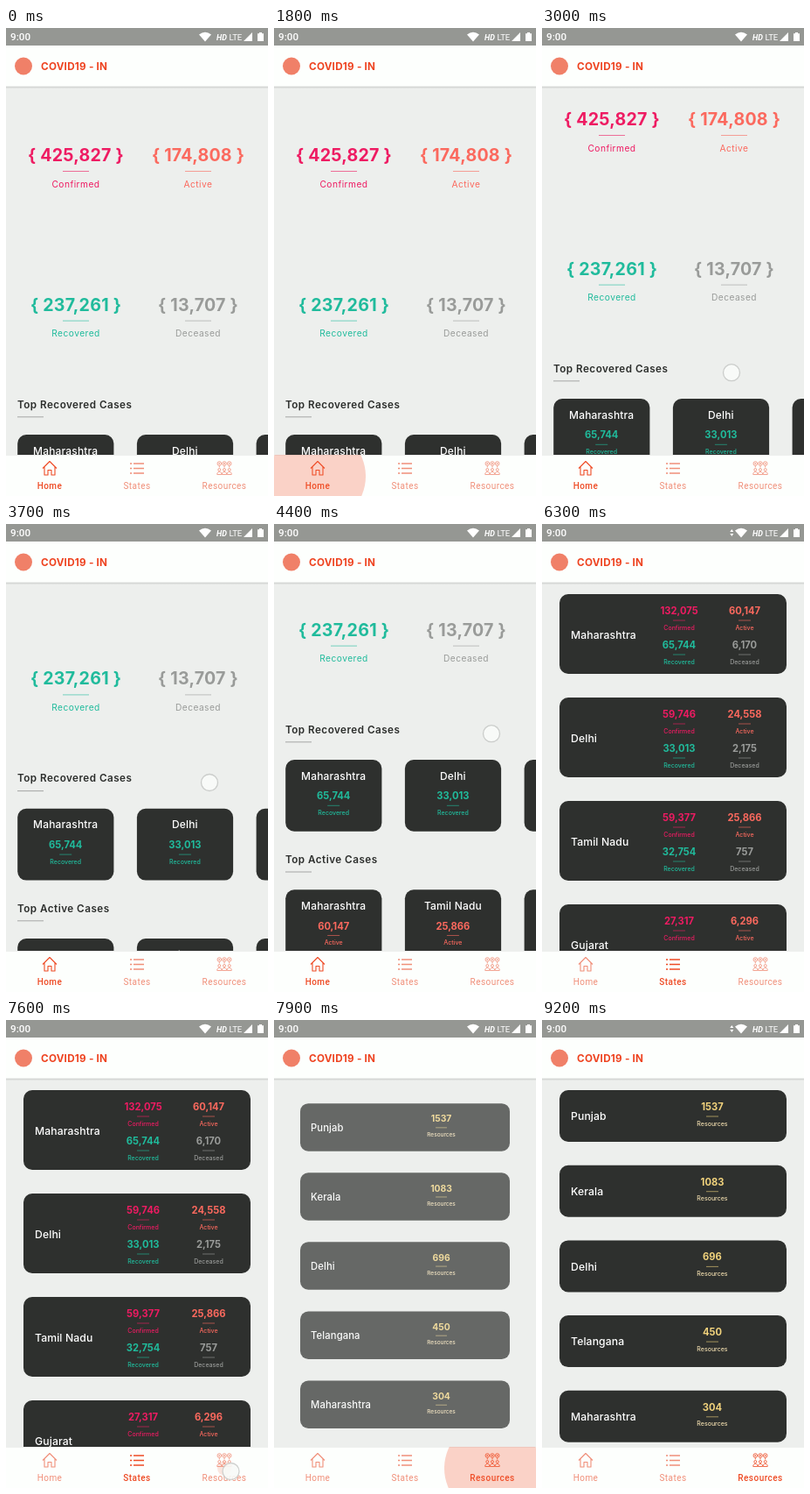
Animation, 300 px wide and 534 px high, one loop 9300 ms. Source, as an HTML page:

```html
<!DOCTYPE html>
<html lang="en">
<head>
<meta charset="utf-8">
<title>Case tracker</title>
<style>
  html, body { margin: 0; width: 100%; height: 100%; overflow: hidden; background: #edefed; }
  svg { display: block; width: 100vw; height: 100vh; }
  text { font-family: Inter, "Open Sans", sans-serif; }
  .ui { font-family: Roboto, sans-serif; }
  .tab { color: #f08f79; }
  .tab.on { color: #ee4b25; }
  .tab.on text { font-weight: 500; }
  .icon { fill: none; stroke: currentColor; }
</style>
</head>
<body>
<svg id="stage" viewBox="0 0 300 534">
  <defs>
    <clipPath id="barClip"><rect y="487" width="300" height="47"/></clipPath>
    <linearGradient id="shade" x2="0" y2="1">
      <stop stop-color="#000" stop-opacity=".15"/><stop offset="1" stop-color="#000" stop-opacity="0"/>
    </linearGradient>
  </defs>
  <rect width="300" height="534" fill="#edefed"/>
  <g id="home"></g>
  <g id="states"></g>
  <g id="resources"></g>

  <rect y="66.5" width="300" height="3" fill="url(#shade)"/>
  <rect y="20" width="300" height="46.5" fill="#fdfffd"/>
  <circle cx="20" cy="43.5" r="10" fill="#f08068"/>
  <g id="title"></g>

  <rect width="300" height="20" fill="#959793"/>
  <g fill="#fff">
    <text class="ui" x="5" y="14.4" font-size="11.7" font-weight="500">9:00</text>
    <path d="M221 7.4Q228 2 235 7.4L228 15.4Z"/>
    <text class="ui" x="241" y="13.5" font-size="9" font-weight="700" font-style="italic">HD</text>
    <text class="ui" x="255.5" y="13.6" font-size="9.6" letter-spacing="-.2">LTE</text>
    <path d="M282 5V15H272ZM288 6.2H290V5H293V6.2H295V15H288Z"/>
    <path id="traffic" d="M215.3 9L217.3 6L219.3 9ZM215.3 11L217.3 14L219.3 11Z"/>
  </g>

  <rect y="487" width="300" height="47" fill="#fdfffd"/>
  <rect y="487" width="300" height="1" fill="#eef0ee"/>
  <g class="tab">
    <path class="icon" stroke-width="1.1" stroke-linejoin="round" d="M42 502.5L50 494.5L58 502.5M44 501V510H48V504.5H52V510H56V501"/>
    <text class="ui" x="50" y="525.8">Home</text>
  </g>
  <g class="tab">
    <path class="icon" stroke-width="1.7" d="M142 497h2.2M146 497h12M142 502.5h2.2M146 502.5h12M142 508h2.2M146 508h12"/>
    <text class="ui" x="150" y="525.8">States</text>
  </g>
  <g class="tab">
    <g id="people" class="icon" stroke-width=".8"></g>
    <text class="ui" x="250" y="525.8">Resources</text>
  </g>
  <circle id="ripple" cy="511.5" fill="#ee5a36" clip-path="url(#barClip)"/>
  <circle id="touch" r="9.5" fill="#f8faf8" stroke="#cbcdcb" stroke-width="1.3"/>
</svg>
<script>
const LOOP = 9300, STEP = 100;
const PINK = '#ee1b62', RED = '#fb695e', TEAL = '#20bb9c', GRAY = '#999b99',
      DARK = '#2e302e', INK = '#2b2d2b', GOLD = '#f1d27c';
const $ = id => document.getElementById(id);

// y is the middle of the capitals
const label = (s, x, y, size, fill, weight = 500, anchor = 'middle', spacing = 0) =>
  `<text x="${x}" y="${y + size * .36}" font-size="${size}" fill="${fill}" font-weight="${weight}" ` +
  `text-anchor="${anchor}" letter-spacing="${spacing}em">${s}</text>`;
const rule = (x, y, w, fill, opacity = .6) =>
  `<rect x="${x}" y="${y}" width="${w}" height="1" fill="${fill}" opacity="${opacity}"/>`;
const card = (x, y, w, h) =>
  `<rect x="${x}" y="${y}" width="${w}" height="${h}" rx="10" fill="${DARK}"/>`;

const total = (value, name, x, y, color) =>
  label(`{ ${value} }`, x, y, 19.6, color, 700, 'middle', .012) + rule(x - 15, y + 18, 30, color) +
  label(name, x, y + 33, 10.2, color, 400, 'middle', .045);
const stat = (value, name, x, y, color, nameColor = color) =>
  label(value, x, y, 11.2, color, 700) + rule(x - 7, y + 10.5, 14, color) +
  label(name, x, y + 19, 7, nameColor);

function topCases(kind, y, color, rows) {
  const cards = rows.map(([name, value], i) => {
    const x = 13.2 + i * 136.7;
    return card(x, y + 34.7, 110.2, 81.8) + label(name, x + 55, y + 53, 12, '#fff', 500, 'middle', .015) +
      stat(value, kind, x + 55, y + 76, color);
  });
  return label(`Top ${kind} Cases`, 13, y, 11.7, INK, 600, 'start', .04) +
    rule(13, y + 14, 30, '#777') + cards.join('') + card(286.6, y + 34.7, 110.2, 81.8);
}

$('home').innerHTML =
  total('425,827', 'Confirmed', 80, 145, PINK) + total('174,808', 'Active', 220, 145, RED) +
  total('237,261', 'Recovered', 80, 315.6, TEAL) + total('13,707', 'Deceased', 220, 315.6, GRAY) +
  topCases('Recovered', 429.3, TEAL, [['Maharashtra', '65,744'], ['Delhi', '33,013']]) +
  topCases('Active', 577.5, RED, [['Maharashtra', '60,147'], ['Tamil Nadu', '25,866']]);

$('states').innerHTML = [
  ['Maharashtra', '132,075', '60,147', '65,744', '6,170'],
  ['Delhi', '59,746', '24,558', '33,013', '2,175'],
  ['Tamil Nadu', '59,377', '25,866', '32,754', '757'],
  ['Gujarat', '27,317', '6,296', '19,357', '1,664']
].map(([name, confirmed, active, recovered, deceased], i) => {
  const y = 80 + i * 118;
  return card(20, y, 260, 91) + label(name, 33, y + 46.5, 12.2, '#fff', 500, 'start', .01) +
    stat(confirmed, 'Confirmed', 157, y + 19, PINK) + stat(active, 'Active', 232, y + 19, RED) +
    stat(recovered, 'Recovered', 157, y + 58, TEAL) + stat(deceased, 'Deceased', 232, y + 58, GRAY);
}).join('');

$('resources').innerHTML = [
  ['Punjab', 1537], ['Kerala', 1083], ['Delhi', 696], ['Telangana', 450], ['Maharashtra', 304]
].map(([name, count], i) => {
  const y = 80 + i * 85.7;
  return card(20, y, 260, 59) + label(name, 33, y + 30, 12.2, '#fff', 500, 'start', .01) +
    stat(count, 'Resources', 195, y + 19, GOLD, '#f0dcae');
}).join('');

$('title').innerHTML = label('COVID19 - IN', 40, 44, 11.7, '#ee4320', 700, 'start', .02);

$('people').innerHTML = [244.3, 250, 255.7].map(x =>
  `<circle cx="${x}" cy="497" r="2.3"/><circle cx="${x}" cy="497" r=".6"/><circle cx="${x}" cy="504" r="1.5"/>` +
  `<path d="M${x} 499.3V501.5M${x - 2.5} 509.5V508Q${x} 504.5 ${x + 2.5} 508V509.5Z"/>`).join('');

const tabs = [...document.querySelectorAll('.tab')];
for (const tab of tabs) {
  const text = tab.querySelector('text');
  text.setAttribute('font-size', 10);
  text.setAttribute('text-anchor', 'middle');
  text.setAttribute('letter-spacing', .45);
  text.setAttribute('fill', 'currentColor');
}

// Linear interpolation through [time, value] points
function track(t, points) {
  if (t <= points[0][0]) return points[0][1];
  for (let i = 1; i < points.length; i++) {
    const [t0, v0] = points[i - 1], [t1, v1] = points[i];
    if (t <= t1) return v0 + (v1 - v0) * (t - t0) / (t1 - t0);
  }
  return points[points.length - 1][1];
}

const SCROLL = [[2800, 0], [2900, 14], [3000, 41], [3200, 80], [3500, 120], [4000, 168],
                [4400, 195], [4700, 212], [4900, 216]];
const DRAG_X = [[2800, 212], [3000, 217], [4400, 249]];
const RIPPLE_R = [[0, 8], [100, 36], [200, 52.5], [300, 55]];
const RIPPLE_ALPHA = [[0, .15], [100, .3], [200, .35], [300, .27], [500, .1], [600, 0]];
const TAP_ALPHA = [[0, .9], [100, .9], [200, .45], [300, 0]];
const ENTER_SCALE = [[0, .85], [100, .923], [200, .968], [300, .99], [400, 1]];
const ENTER_ALPHA = [[0, 0], [100, .7], [200, .92], [300, 1]];
const TAPS = [[1500, 50], [5600, 150.5], [7600, 250]];
const OPENED = [0, 5800, 7800];

function set(id, attributes) {
  for (const name in attributes) $(id).setAttribute(name, attributes[name]);
}

function drawPages(t) {
  const current = t >= OPENED[2] ? 2 : t >= OPENED[1] ? 1 : 0;
  ['home', 'states', 'resources'].forEach((id, i) => {
    tabs[i].classList.toggle('on', i === current);
    set(id, { display: i === current ? 'inline' : 'none' });
    if (i !== current || i === 0) return;
    const age = t - OPENED[i];
    set(id, {
      opacity: track(age, ENTER_ALPHA),
      transform: `translate(150 277) scale(${track(age, ENTER_SCALE)}) translate(-150 -277)`
    });
  });
  set('home', { transform: `translate(0 ${-track(t, SCROLL)})` });
}

function drawTouch(t) {
  const tap = TAPS.find(([at]) => t >= at && t < at + 700);
  set('ripple', { opacity: 0 });
  set('touch', { opacity: 0 });
  if (tap) {
    const [at, x] = tap, age = t - at;
    set('ripple', { cx: x, r: track(age, RIPPLE_R), opacity: track(age, RIPPLE_ALPHA) });
    set('touch', { cx: x + 7.5, cy: 515, opacity: track(age, TAP_ALPHA) });
  } else if (t >= 2800 && t < 4700) {
    set('touch', { cx: track(t, DRAG_X), cy: 434.2 - track(t, SCROLL), opacity: 1 });
  }
}

function render(now) {
  const t = Math.floor(now % LOOP / STEP) * STEP;
  drawPages(t);
  drawTouch(t);
  set('traffic', { opacity: t >= 6200 && t < 7300 || t >= 8300 ? 1 : 0 });
}

let start;
function tick(now) {
  start ??= now;
  render(now - start);
  requestAnimationFrame(tick);
}
render(0);
requestAnimationFrame(tick);
</script>
</body>
</html>
```
